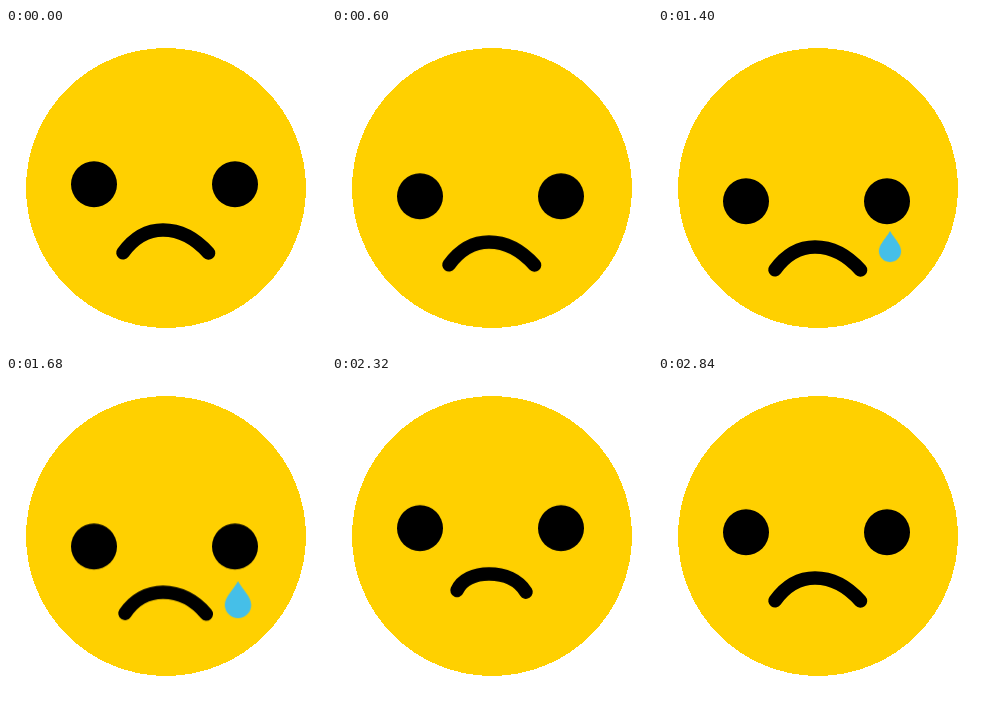
Write an HTML page that moves like this. It is 320 px wide and 320 px high and loops after 2880 ms.

```html
<!DOCTYPE html>
<html lang="en">
<head>
<meta charset="utf-8">
<title>Sad face</title>
<style>
  html, body { margin: 0; width: 100%; height: 100%; overflow: hidden; background: #fff; }
  svg { display: block; width: 100%; height: 100%; }

  .bob, .eye, .mouth { animation: 2880ms ease-in-out infinite; }
  .bob { animation-name: bob; }
  .eye { animation-name: blink; transform-box: fill-box; transform-origin: center; }
  .mouth {
    animation-name: pout;
    fill: none; stroke: #000; stroke-width: 13.6; stroke-linecap: round;
    d: path("M117 224.7 C127 211 141 202 157 202 C174 202 190 211 202.5 225");
  }
  .tear {
    fill: #45bfe8; opacity: 0;
    animation: fall 2880ms linear infinite, fade 2880ms ease-in-out infinite;
  }

  @keyframes bob {
    0%, 100% { transform: translateY(0); }
    33.333%, 50% { transform: translateY(17px); }
    83.333% { transform: translateY(-4.4px); }
  }
  @keyframes blink {
    0%, 25%, 41.667%, 100% { transform: scaleY(1); }
    33.333% { transform: scaleY(.53); }
  }
  @keyframes pout {
    0%, 50%, 100% { d: path("M117 224.7 C127 211 141 202 157 202 C174 202 190 211 202.5 225"); }
    75% { d: path("M126 217.7 C130 207 143 202 157 202 C172 202 186 207.5 193 219.5"); }
  }
  @keyframes fall {
    0%, 29.167% { transform: translate(232px, 192.5px) scale(.577); }
    48.611% { transform: translate(232px, 203px) scale(.74); }
    66.667%, 100% { transform: translate(232px, 207px) scale(1); }
  }
  @keyframes fade {
    0%, 29.167%, 75%, 100% { opacity: 0; }
    41.667%, 66.667% { opacity: 1; }
  }
</style>
</head>
<body>
<svg viewBox="0 0 320 320">
  <circle cx="160" cy="160" r="140" fill="#ffd000" shape-rendering="crispEdges"/>
  <g class="bob">
    <circle class="eye" cx="88" cy="156.3" r="23"/>
    <circle class="eye" cx="229" cy="156.3" r="23"/>
    <path class="mouth"/>
  </g>
  <path class="tear" d="M0 0 C5 9 15 18 15 27 A15 15 0 0 1 -15 27 C-15 18 -5 9 0 0Z"/>
</svg>
</body>
</html>
```
